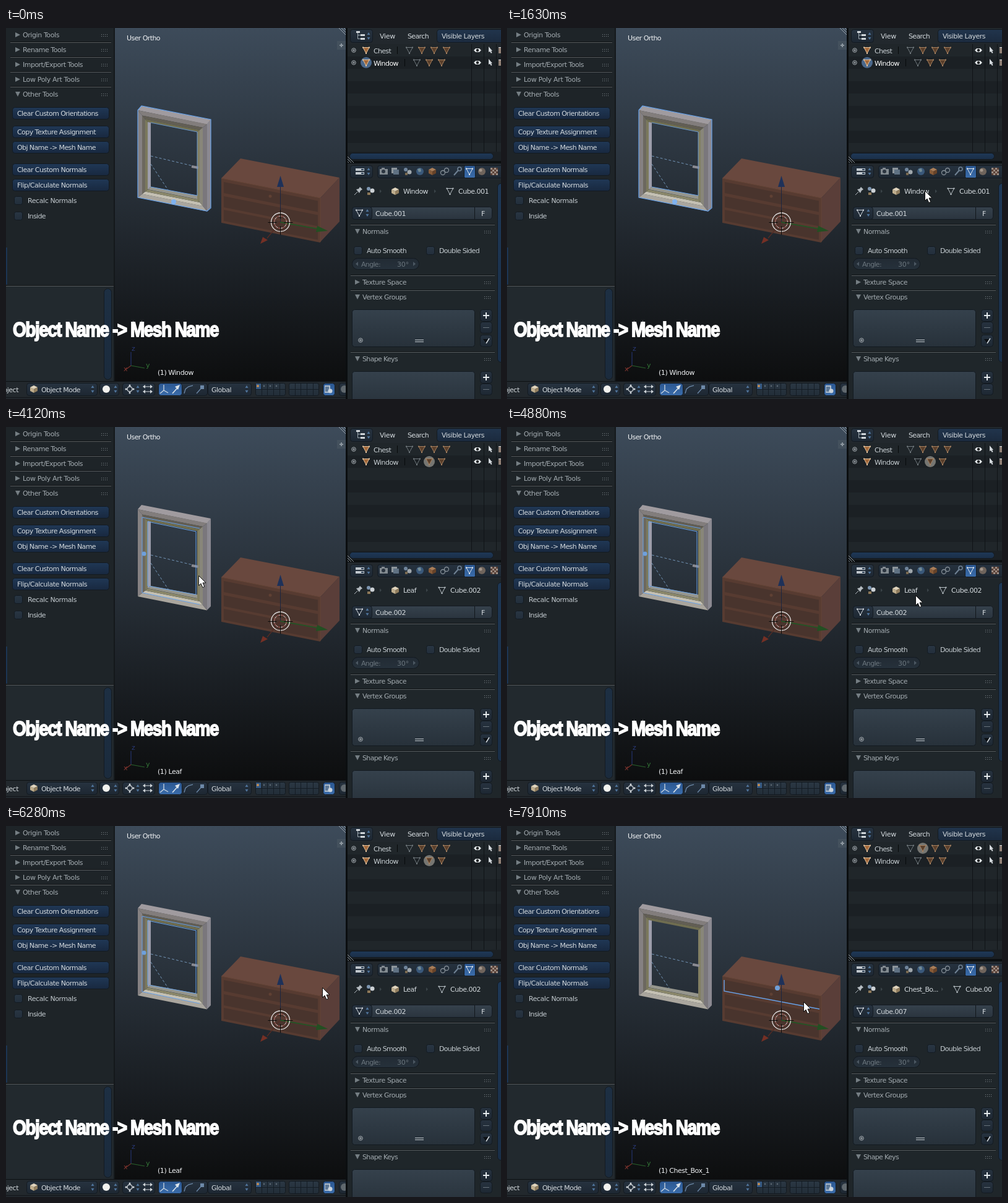
Write an HTML page with a canvas that moves like this. It is 800x600 px and loops after 7990 ms.

```html
<!DOCTYPE html>
<html lang="en">
<head>
<meta charset="utf-8">
<title>Object Name to Mesh Name</title>
<style>
  html, body { margin: 0; height: 100%; overflow: hidden; background: #1e2428; }
  canvas { display: block; }
</style>
</head>
<body>
<canvas id="stage" width="800" height="600"></canvas>
<script>
const c = document.getElementById('stage').getContext('2d');
const LOOP = 7990, SLOPE = 0.2;
const SELECT = '#69a3ea', LABEL = '#a3abb0', BRIGHT = '#d3d9dd';
const WIDGET = ['#273340', '#1d2732'], ACTIVE = ['#2b5791', '#3b6dab'];

// Selection states: start, object, mesh, x of mesh name, outliner highlight
const states = [
  { t: 0, name: 'Window', mesh: 'Cube.001', x: 731, mark: [582, 56] },
  { t: 4120, name: 'Leaf', mesh: 'Cube.002', x: 718, mark: [684, 56] },
  { t: 6450, name: 'Chest', mesh: 'Cube.006', x: 725, mark: [582, 36] },
  { t: 7530, name: 'Chest_Box_1', mesh: 'Cube.007', x: 741, mark: [672, 36] },
];

// Pointer moves: first step, last step, number of steps, goal x, goal y
const moves = [
  [480, 480, 1, 683, 553], [560, 940, 6, 605, 305], [1000, 1140, 3, 640, 264],
  [1390, 1390, 1, 675, 264], [1460, 1460, 1, 658, 264], [1630, 1630, 1, 675, 263],
  [1700, 1700, 1, 664, 264], [1870, 2110, 4, 605, 304], [2260, 2950, 10, 360, 255],
  [3030, 3030, 1, 328, 242], [3260, 3340, 2, 320, 241], [3490, 3570, 2, 314, 241],
  [3800, 3800, 1, 313, 241], [3950, 3950, 1, 311, 240], [4500, 4880, 6, 660, 272],
  [5050, 5130, 2, 644, 274], [5280, 5280, 1, 663, 267], [5360, 5660, 5, 628, 289],
  [5740, 5820, 2, 603, 300], [5970, 6280, 5, 511, 261], [6670, 6750, 2, 514, 261],
  [6900, 7130, 4, 479, 284],
];

function pointerAt(t) {
  let x = 683, y = 553;
  for (const [from, to, steps, gx, gy] of moves) {
    if (t < from) break;
    const done = Math.min(1, (1 + Math.floor((t - from) / (to - from || 1) * (steps - 1) + 0.01)) / steps);
    x += (gx - x) * done;
    y += (gy - y) * done;
  }
  return [x, y];
}

function rect(x, y, w, h, fill) {
  c.fillStyle = fill;
  c.fillRect(x, y, w, h);
}
function shade(y, h, top, bottom) {
  const g = c.createLinearGradient(0, y, 0, y + h);
  g.addColorStop(0, top);
  g.addColorStop(1, bottom);
  return g;
}
function box(x, y, w, h, [top, bottom], r = 4) {
  c.beginPath();
  c.roundRect(x + 0.5, y + 0.5, w - 1, h - 1, r);
  c.fillStyle = shade(y, h, top, bottom);
  c.fill();
  c.strokeStyle = '#131a21';
  c.lineWidth = 1;
  c.stroke();
}
function trace(points) {
  c.beginPath();
  for (let i = 0; i < points.length; i += 2) c.lineTo(points[i], points[i + 1]);
}
function poly(points, fill) {
  trace(points);
  c.fillStyle = fill;
  c.fill();
}
function line(points, color, width = 1, closed = false) {
  trace(points);
  if (closed) c.closePath();
  c.strokeStyle = color;
  c.lineWidth = width;
  c.stroke();
}
function disc(x, y, r, fill) {
  c.beginPath();
  c.arc(x, y, r, 0, 7);
  c.fillStyle = fill;
  c.fill();
}
function ring(x, y, r, color, width = 1) {
  c.beginPath();
  c.arc(x, y, r, 0, 7);
  c.strokeStyle = color;
  c.lineWidth = width;
  c.stroke();
}

// Interface text advances by whole pixels per glyph
const spacing = new Map();
function text(str, x, middle, color = BRIGHT) {
  c.font = '11px "DejaVu Sans", sans-serif';
  c.letterSpacing = '0px';
  if (!spacing.has(str)) {
    const width = s => c.measureText(s).width;
    const whole = [...str].reduce((sum, ch) => sum + Math.floor(width(ch) + 0.01), 0);
    spacing.set(str, (whole - width(str)) / str.length);
  }
  c.letterSpacing = spacing.get(str) + 'px';
  c.fillStyle = color;
  c.fillText(str, x, middle + 4);
}

// Icons
const meshIcon = (x, y, color, fill = 'transparent') => {
  const p = [x - 5, y - 4.5, x + 5, y - 4.5, x, y + 5];
  poly(p, fill);
  line(p, color, 1, true);
  for (let i = 0; i < 6; i += 2) rect(p[i] - 1, p[i + 1] - 1, 2, 2, color);
};
const cubeIcon = (x, y, top = '#e0d4bd', left = '#bfae8e', right = '#917e5f') => {
  poly([x, y - 6, x + 6, y - 3, x, y, x - 6, y - 3], top);
  poly([x - 6, y - 3, x, y, x, y + 6, x - 6, y + 3], left);
  poly([x + 6, y - 3, x, y, x, y + 6, x + 6, y + 3], right);
};
const upDown = (x, y) => {
  poly([x - 2.5, y - 2, x + 2.5, y - 2, x, y - 6], '#50759c');
  poly([x - 2.5, y + 2, x + 2.5, y + 2, x, y + 6], '#50759c');
};
const plus = (x, y, r = 5, color = '#e4e9ec', width = 2) => {
  rect(x - r, y - width / 2, 2 * r, width, color);
  rect(x - width / 2, y - r, width, 2 * r, color);
};
const expander = (x, y) => {
  ring(x, y, 3.3, '#a9b0b5');
  plus(x, y, 2, '#a9b0b5', 1);
};

function separator(x, y, w) {
  rect(x, y - 1, w, 1, 'rgba(0,0,0,.5)');
  rect(x, y, w, 1, 'rgba(255,255,255,.25)');
}
function panelHeader(label, x, y, open, gripX) {
  poly(open ? [x, y - 4, x + 8, y - 4, x + 4, y + 4] : [x, y - 4, x + 8, y, x, y + 4], '#757e83');
  text(label, x + 12, y, LABEL);
  for (let i = 0; i < 8; i++) rect(gripX + i % 4 * 3, y + (i < 4 ? -1 : 2), 1, 1, '#7d858a');
}
function checkbox(x, y, label, labelX) {
  box(x, y - 7, 14, 14, ['#293643', '#222e3b'], 3);
  text(label, labelX, y, '#c3cacf');
}

function drawTools() {
  rect(0, 0, 176, 600, '#1e2428');
  rect(0, 418, 174, 153, '#22292e');
  separator(0, 417, 174);
  rect(0, 355, 2, 60, '#1c3553');
  box(158, 421, 13, 148, ['#1d2f43', '#1b2b3d'], 6);
  ['Origin', 'Rename', 'Import/Export', 'Low Poly Art', 'Other'].forEach((tool, i) => {
    const y = 11 + 24 * i;
    if (i) separator(7, y - 12, 163);
    panelHeader(tool + ' Tools', 15, y, i === 4, 154);
  });
  [['Clear Custom Orientations', 138], ['Copy Texture Assignment', 168], ['Obj Name -> Mesh Name', 193],
    ['Clear Custom Normals', 229], ['Flip/Calculate Normals', 254]].forEach(([label, y]) => {
    box(10, y - 10, 157, 20, ['#203856', '#18283f']);
    text(label, 18, y);
  });
  checkbox(13, 279, 'Recalc Normals', 35);
  checkbox(13, 304, 'Inside', 35);
  rect(174, 0, 2, 571, '#14181b');
}

// Quad on a front face: left edge, top left y, right edge, height
const face = (l, t, r, h) => [l, t, r, t + (r - l) * SLOPE, r, t + (r - l) * SLOPE + h, l, t + h];

function bevel(l, t, r, h, inset, [left, top, right, bottom]) {
  const a = face(l, t, r, h);
  const b = face(l + inset, t + inset * (1 + SLOPE), r - inset, h - 2 * inset);
  [top, right, bottom, left].forEach((color, i) => {
    const j = 2 * i, k = (j + 2) % 8;
    poly([a[j], a[j + 1], a[k], a[k + 1], b[k], b[k + 1], b[j], b[j + 1]], color);
  });
}

function drawWindow(selected) {
  poly([213, 133, 219, 126, 331, 148, 325, 156], '#a09b9f');
  poly([325, 155, 331, 148, 331, 290, 325, 296], '#8b8991');
  bevel(213, 133, 325, 141, 7, ['#858182', '#827d7c', '#7a777c', '#aaa69e']);
  bevel(220, 141.4, 318, 127, 5, ['#6c685f', '#625e54', '#88867a', '#c4c0b3']);
  bevel(225, 147.4, 313, 117, 4, ['#7b795d', '#6f6d50', '#827f63', '#8b886b']);
  poly([229, 152, 234, 153, 234, 257, 229, 261], '#9d9dab');
  poly([229, 261, 234, 257, 309, 271, 309, 277], '#96968d');
  c.setLineDash([4, 3]);
  line([234, 207, 306, 224], '#7395b7');
  line([234, 220, 262, 262], '#7395b7');
  c.setLineDash([]);
  line([300, 224, 311, 226], '#8b8b92', 4);
  if (selected === 'Window') {
    line([213, 133, 219, 126, 331, 148, 331, 291, 325, 296, 213, 274], SELECT, 1.2, true);
    line([234, 257, 309, 271], SELECT);
    line([234, 153, 309, 168, 309, 271], SELECT, 0.8);
    disc(271, 281, 4, '#7fb2f0');
  } else if (selected === 'Leaf') {
    line([313, 164, 220, 146, 220, 268, 313, 287], SELECT);
    line([229, 153, 307, 169, 307, 271, 229, 257], SELECT, 1, true);
    disc(223, 205, 3.5, '#6fa0dc');
  }
}

function drawChest(selected) {
  poly([348, 243, 379, 211, 539, 242, 508, 275], '#69483e');
  poly(face(348, 243, 508, 72), '#573b31');
  poly([508, 275, 539, 242, 539, 313, 508, 346], '#5a3e39');
  for (const y of [249, 272, 294]) poly(face(352, y, 504, 18), '#49342d');
  line([348, 243, 508, 275, 508, 346], '#654436');
  disc(427, 272, 2.5, '#5f4034');
  if (selected === 'Chest') {
    line([348, 243, 379, 211, 539, 242, 539, 313, 508, 346, 348, 315], SELECT, 1.3, true);
  } else if (selected === 'Chest_Box_1') {
    line([351, 249, 351, 267, 505, 296], SELECT, 1.4);
    disc(437, 262, 4, '#6f9fd8');
  }
}

function drawGizmo() {
  line([443.5, 314, 443.5, 256], '#1c2640');
  poly([438, 257, 449, 257, 443.5, 239], '#1e3159');
  line([443, 314, 505, 325], '#1e5a24', 1.3);
  poly([503, 320, 501, 330, 520, 328], '#234f22');
  line([443, 314, 422, 340], '#552c25', 1.3);
  poly([411, 349, 415, 338, 423, 343], '#743025');
  ring(443.5, 314, 15, '#e4e4e4', 1.3);
  ring(443.5, 314, 10, '#d8cfcf');
  c.setLineDash([4, 4]);
  ring(443.5, 314, 10, '#8e2f28');
  c.setLineDash([]);
  for (const [dx, dy] of [[1, 0], [-1, 0], [0, 1], [0, -1]]) {
    line([443.5 + 6 * dx, 314.5 + 6 * dy, 443.5 + 20 * dx, 314.5 + 20 * dy], '#080808');
  }
}

function drawViewport({ name }) {
  rect(176, 0, 374, 571, shade(0, 571, '#3d4b5a', '#0d0e0f'));
  drawWindow(name);
  drawChest(name);
  drawGizmo();
  line([202, 546, 202, 524], '#24336b', 1.2);
  line([202, 546, 224, 550], '#2a622d', 1.2);
  line([202, 546, 194, 552], '#77302a', 1.2);
  text('z', 203, 518, '#2a3a78');
  text('y', 226, 545, '#357638');
  text('x', 190, 551, '#843630');
  text('User Ortho', 195, 16, '#f0f2f4');
  text(`(1) ${name}`, 245, 557, '#f0f2f4');
  rect(535, 21, 14, 14, '#44515d');
  plus(542, 28, 3, '#8d979f');
  for (let i = 0; i < 3; i++) line([538 + i * 4, 0, 550, 12 - i * 4], '#98a2ab');
}

function drawFooter() {
  rect(0, 571, 550, 29, '#22282d');
  rect(0, 571, 550, 1, '#0d1013');
  rect(0, 597, 550, 1, '#111519');
  text('Object', -13, 585);
  box(33, 574, 115, 21, WIDGET);
  cubeIcon(45, 584);
  text('Object Mode', 57, 585);
  upDown(140, 584);
  box(151, 574, 32, 21, WIDGET);
  disc(162, 584, 6, '#f1f1ee');
  upDown(177, 584);
  box(188, 574, 53, 21, WIDGET);
  ring(200, 584, 4, '#d5dade', 1.4);
  for (const [x, y] of [[200, 578], [200, 590], [194, 584], [206, 584]]) disc(x, y, 1.5, '#d5dade');
  upDown(213, 584);
  for (const y of [580, 588]) {
    line([223, y, 235, y], '#cfd5d9');
    poly([221, y, 225, y - 3, 225, y + 3], '#cfd5d9');
    poly([237, y, 233, y - 3, 233, y + 3], '#cfd5d9');
  }
  box(246, 574, 80, 21, WIDGET);
  box(246, 574, 39, 21, ACTIVE);
  line([255, 577, 255, 586, 249, 591], '#cdd8e2', 1.3);
  line([255, 586, 262, 590], '#cdd8e2', 1.3);
  line([269, 591, 278, 581], '#dbe3ea', 1.6);
  poly([281, 577, 273, 580, 278, 585], '#dbe3ea');
  line([288, 591, 290, 584, 295, 580, 302, 578], '#6d89a8', 1.3);
  line([308, 591, 316, 582], '#6d89a8', 1.3);
  rect(314, 578, 6, 6, '#6d89a8');
  box(326, 574, 71, 21, WIDGET);
  text('Global', 332, 585);
  upDown(389, 584);
  for (const x of [403, 457]) {
    box(x, 574, 49, 21, ['#2b3844', '#222d38'], 3);
    for (let i = 1; i < 5; i++) rect(x + Math.round(i * 9.7), 575, 1, 19, '#151d25');
    rect(x, 584, 49, 1, '#151d25');
  }
  rect(404, 575, 8, 9, '#345882');
  disc(407, 579, 2, '#c98f50');
  for (const x of [417, 427, 437]) disc(x, 579, 1.3, '#5d6974');
  box(512, 574, 20, 21, ACTIVE);
  rect(515, 578, 9, 12, '#aebccb');
  rect(516, 580, 6, 8, '#5c7795');
  disc(524, 587, 3.5, '#c9d3dc');
  box(538, 574, 20, 21, WIDGET);
  disc(547, 584, 6, '#60686e');
}

function drawOutliner({ mark }) {
  rect(550, 0, 250, 600, '#1b2024');
  rect(552, 0, 248, 26, '#22282d');
  box(556, 2, 37, 22, WIDGET);
  rect(566, 5, 6, 3, '#d0d6da');
  line([568.5, 8, 568.5, 17.5, 573, 17.5], '#9faab2');
  line([568, 11.5, 573, 11.5], '#9faab2');
  rect(573, 10, 7, 3, '#d0d6da');
  rect(573, 16, 7, 3, '#d0d6da');
  upDown(586, 13);
  text('View', 604, 13);
  text('Search', 649, 13);
  box(696, 2, 110, 22, ['#21354d', '#1b2a3d']);
  text('Visible Layers', 704, 13);
  for (let y = 26; y < 200; y += 40) rect(552, y, 248, Math.min(20, 200 - y), '#20262a');
  for (const x of [752, 772, 792]) rect(x, 26, 1, 174, '#0f1316');
  disc(...mark, 9, mark[0] === 582 ? '#4b688b' : '#767672');
  [['Chest', 36, 652, 3], ['Window', 56, 664, 2]].forEach(([label, y, x, children]) => {
    expander(562, y);
    meshIcon(582, y, '#e6c39d', '#a4693a');
    text(label, 594, y + 1, mark[0] === 582 && mark[1] === y ? '#ffffff' : '#c9d0d4');
    rect(x - 20, y - 6, 1, 12, '#07090b');
    meshIcon(x, y, '#70787d');
    for (let i = 1; i <= children; i++) meshIcon(x + 20 * i, y, '#a5805f', '#5a3f2b');
    poly([756, y, 759, y - 3, 765, y - 3, 768, y, 765, y + 3, 759, y + 3], '#e2e6e8');
    disc(762, y, 2.2, '#15191c');
    poly([780, y - 6, 780, y + 3, 782, y + 2, 784, y + 5, 785.5, y + 4, 784, y + 1, 786, y + 1], '#d5dade');
    rect(796, y - 4, 4, 9, '#8f7f75');
    line([796, y - 4.5, 800, y - 4.5], '#d5dade');
  });
  box(555, 202, 233, 11, ['#1f3958', '#1a2e47'], 5);
  rect(550, 215, 250, 4, '#0b0e10');
  for (let i = 0; i < 3; i++) line([552, 208 + i * 4, 562 - i * 4, 218], '#8e989f');
}

function drawTabs() {
  rect(552, 219, 248, 27, '#22282d');
  box(556, 222, 37, 21, WIDGET);
  for (const y of [227, 233]) {
    rect(565, y, 14, 4, '#c0c7cd');
    rect(574, y + 1, 4, 2, '#2c3f55');
  }
  upDown(586, 232);
  box(600, 222, 205, 21, WIDGET);
  rect(604, 228, 13, 9, '#828a90');
  rect(607, 226, 5, 3, '#828a90');
  disc(610, 232, 3, '#2b3540');
  rect(623, 226, 9, 9, '#8d959b');
  rect(626, 229, 9, 8, '#5f7183');
  disc(646, 229, 3, '#6f849b');
  disc(652, 233, 3.5, '#a0a7ac');
  rect(645, 234, 4, 4, '#7a6a51');
  disc(669, 232, 6, '#3a587a');
  poly([665, 228, 670, 227, 671, 232, 667, 233], '#738a94');
  cubeIcon(689, 232, '#a87d58', '#875b38', '#674329');
  ring(706, 234, 3.5, '#858f97', 1.3);
  ring(712, 230, 3.5, '#858f97', 1.3);
  line([724, 238, 731, 230], '#6f8193', 2);
  ring(733, 228, 3, '#6f8193', 1.6);
  box(740, 222, 19, 21, ACTIVE, 2);
  meshIcon(749, 232, '#dfe6ec');
  disc(769, 232, 6, '#6f645c');
  disc(767, 230, 2.5, '#a3968b');
  for (let i = 0; i < 16; i++) {
    rect(783 + i % 4 * 3, 226 + (i >> 2) * 3, 3, 3, (i + (i >> 2)) % 2 ? '#5a4036' : '#9a8b82');
  }
}

function drawList(y, h) {
  box(559, y, 199, h, ['#35414c', '#27313a']);
  box(766, y, 20, 20, WIDGET);
  plus(776, y + 10);
  box(766, y + 20, 20, 19, WIDGET);
  rect(771, y + 29, 10, 1, '#67727b');
}

function drawProperties({ name, mesh, x }) {
  rect(552, 246, 248, 354, '#1f262a');
  drawTabs();
  line([563, 270, 568, 265], '#b5bcc1');
  poly([566, 261, 571, 267, 573, 263, 576, 261, 572, 257, 570, 260], '#b5bcc1');
  disc(586, 260, 3, '#7d96b1');
  disc(592, 263, 3.5, '#cdd2d6');
  rect(584, 266, 5, 4, '#8d7858');
  for (const ax of [604, x - 39]) poly([ax, 261, ax + 3, 264, ax, 267], '#3b4449');
  cubeIcon(629, 264);
  text(name.length > 8 ? 'Chest_Bo...' : name, 642, 264);
  meshIcon(x - 13.5, 264, '#b9c1c6');
  c.save();
  c.beginPath();
  c.rect(552, 250, 231, 28);
  c.clip();
  text(mesh, x, 264);
  c.restore();
  box(559, 289, 227, 21, ['#36424d', '#2a343e']);
  box(559, 289, 33, 21, WIDGET);
  meshIcon(571, 299, '#d5dce1');
  upDown(584, 299);
  text(mesh, 597, 300);
  rect(757, 290, 1, 19, '#11161b');
  text('F', 768, 300);
  separator(557, 318, 233);
  panelHeader('Normals', 564, 329, true, 773);
  checkbox(562, 360, 'Auto Smooth', 583);
  checkbox(679, 360, 'Double Sided', 700);
  box(559, 372, 109, 19, ['#222b34', '#26313b'], 9);
  poly([569, 378, 569, 385, 565, 381.5], '#4c5863');
  poly([658, 378, 658, 385, 662, 381.5], '#4c5863');
  text('Angle:', 574, 382, '#6b767e');
  text('30°', 632, 382, '#6b767e');
  separator(557, 400, 233);
  panelHeader('Texture Space', 564, 411, false, 773);
  separator(557, 424, 233);
  panelHeader('Vertex Groups', 564, 435, true, 773);
  drawList(455, 61);
  expander(573, 505);
  rect(661, 504, 14, 1, '#c5ccd1');
  rect(661, 507, 14, 1, '#c5ccd1');
  box(766, 496, 20, 20, WIDGET);
  poly([771, 503, 781, 503, 776, 510], '#0c1014');
  line([781, 502, 776, 510], '#d5dce1', 1.5);
  separator(557, 524, 233);
  panelHeader('Shape Keys', 564, 535, true, 773);
  drawList(555, 61);
  box(794, 251, 12, 290, ['#1e3856', '#1a2f48'], 6);
  rect(549, 0, 3, 600, '#0b0e10');
}

// Tall heavy heading
function drawHeading() {
  c.save();
  c.translate(11, 499);
  c.scale(1, 1.19);
  c.font = 'bold 28px "Liberation Sans", sans-serif';
  c.letterSpacing = '-1.5px';
  c.fillStyle = c.strokeStyle = '#ffffff';
  c.lineWidth = 1.5;
  c.shadowColor = 'rgba(0,0,0,.7)';
  c.shadowBlur = 2;
  c.fillText('Object Name -> Mesh Name', 0, 0);
  c.shadowColor = 'transparent';
  c.strokeText('Object Name -> Mesh Name', 0, 0);
  c.restore();
}

function drawPointer(t) {
  if (t < moves[0][0]) return;
  c.save();
  c.translate(...pointerAt(t));
  const arrow = [0.5, 0.5, 0.5, 16.5, 4, 13, 6.8, 19.5, 9.8, 18.2, 7, 12, 12, 12];
  poly(arrow, '#ffffff');
  line(arrow, '#101010', 1, true);
  c.restore();
}

function frame(now) {
  const t = now % LOOP;
  const state = states.findLast(s => t >= s.t);
  drawViewport(state);
  drawTools();
  drawFooter();
  drawOutliner(state);
  drawProperties(state);
  drawHeading();
  drawPointer(t);
  requestAnimationFrame(frame);
}
requestAnimationFrame(frame);
</script>
</body>
</html>
```
